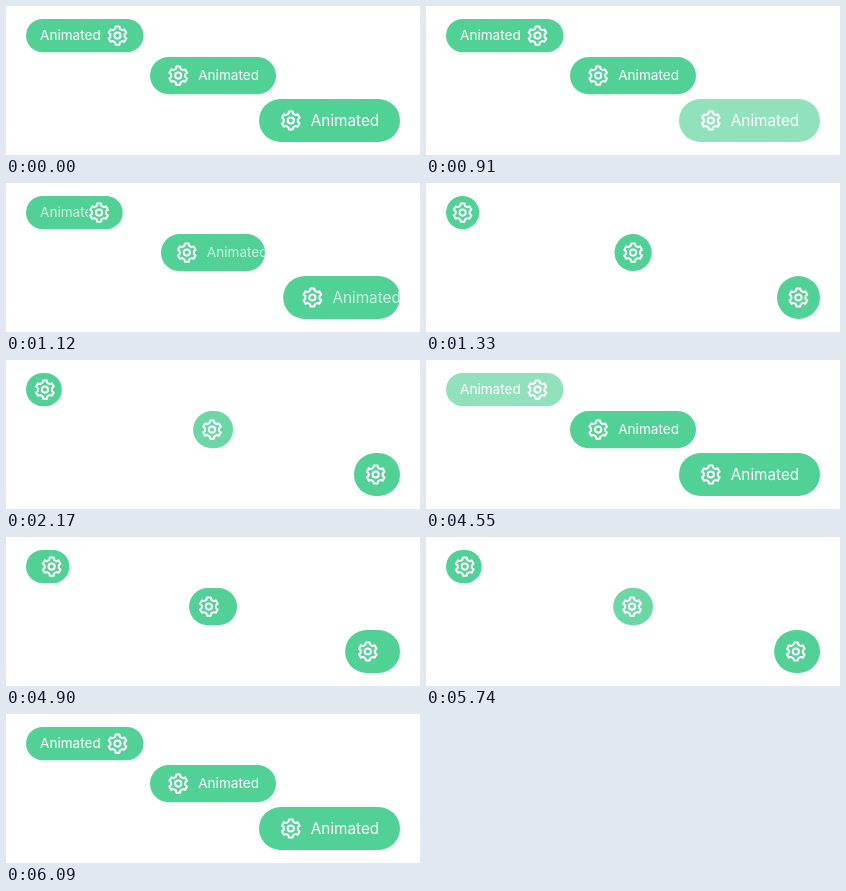
Write an HTML page that moves like this. It is 414 by 149 pixels and loops after 6.3 s.

```html
<!DOCTYPE html>
<html lang="en">
<head>
<meta charset="utf-8">
<title>Animated buttons</title>
<style>
  html, body { margin: 0; width: 100%; height: 100%; overflow: hidden; background: #fff; }
  #stage { display: block; width: 414px; height: 149px; }
  text { font-family: Inter, Roboto, sans-serif; fill: #fff; }
  .pill { fill: #52d196; }
  .gear { fill: none; stroke: #fff; stroke-width: 2; stroke-linejoin: round; }
</style>
</head>
<body>
<svg id="stage" viewBox="0 0 414 149"></svg>
<script>
const LOOP = 6300, STEP = 70;

// Pairs are [expanded, collapsed].
const buttons = [
  { x: [20, 20], w: [117.5, 33.2], y: 13, h: 33.2, icon: [111.5, 36.6], font: 13.6, labelFirst: true,
    presses: [[4550, 4690]] },
  { x: [144, 188.5], w: [126, 37.2], y: 51, h: 37.2, icon: [172.2, 207.1], font: 13.6,
    presses: [[1960, 2170], [5600, 5740]] },
  { x: [253, 351], w: [141, 43], y: 93, h: 43, icon: [284.8, 372.4], font: 15.3,
    presses: [[910, 1050]] }
];

// Each entry: start, duration, collapse amount at the end.
const toggles = [[1010, 320, 1], [2130, 320, 0], [4650, 330, 1], [5700, 330, 0]];

const stage = document.getElementById('stage');
const mix = ([from, to], amount) => from + (to - from) * amount;

function add(parent, tag, attrs) {
  const node = document.createElementNS('http://www.w3.org/2000/svg', tag);
  set(node, attrs);
  parent.append(node);
  return node;
}

function set(node, attrs) {
  for (const key in attrs) node.setAttribute(key, attrs[key]);
}

function gearPath() {
  const points = [];
  const profile = [[-19, 7.2], [-12, 9.3], [12, 9.3], [19, 7.2]];
  for (let tooth = 0; tooth < 6; tooth++) {
    for (const [offset, radius] of profile) {
      const angle = (tooth * 60 - 90 + offset) * Math.PI / 180;
      points.push(`${(radius * Math.cos(angle)).toFixed(2)} ${(radius * Math.sin(angle)).toFixed(2)}`);
    }
  }
  return `M${points.join('L')}Z`;
}

for (const button of buttons) {
  const { y, h, font } = button;
  button.group = add(stage, 'g', {});
  button.pill = add(button.group, 'rect', { class: 'pill', y, height: h, rx: h / 2 });
  button.window = add(button.group, 'svg', { y, height: h, overflow: 'hidden' });
  button.label = add(button.window, 'text', {
    x: button.labelFirst ? 14 : 9, y: h / 2 + font * 0.36, 'font-size': font
  });
  button.label.textContent = 'Animated';
  button.gear = add(button.group, 'g', { class: 'gear' });
  add(button.gear, 'path', { d: gearPath() });
  add(button.gear, 'circle', { r: 3.1 });
}

// Ease-in-out, cubic-bezier(.42, 0, .58, 1).
function ease(t) {
  if (t <= 0 || t >= 1) return Math.min(1, Math.max(0, t));
  let low = 0, high = 1;
  for (let i = 0; i < 20; i++) {
    const s = (low + high) / 2;
    const x = 3 * (1 - s) ** 2 * s * 0.42 + 3 * (1 - s) * s * s * 0.58 + s ** 3;
    if (x < t) low = s; else high = s;
  }
  return low * low * (3 - 2 * low);
}

function collapseAt(time) {
  let amount = 0;
  for (const [start, duration, end] of toggles) {
    if (time >= start) amount = mix([1 - end, end], ease((time - start) / duration));
  }
  return amount;
}

function opacityAt(time, presses) {
  for (const [down, up] of presses) {
    if (time >= down && time < up) return 0.63;
    if (time >= up && time < up + STEP) return 0.85;
  }
  return 1;
}

function draw(time) {
  const amount = collapseAt(time);
  for (const button of buttons) {
    const x = mix(button.x, amount), w = mix(button.w, amount), icon = mix(button.icon, amount);
    const left = button.labelFirst ? x : icon + 11;
    const right = button.labelFirst ? icon - 11 : x + w;
    set(button.pill, { x, width: w, 'fill-opacity': opacityAt(time, button.presses) });
    set(button.window, { x: left, width: Math.max(0, right - left) });
    set(button.label, { opacity: Math.max(0, 1 - amount * 1.25) });
    set(button.gear, { transform: `translate(${icon} ${button.y + button.h / 2})` });
  }
}

const origin = performance.now();
function tick() {
  const time = (performance.now() - origin) % LOOP;
  draw(Math.floor(time / STEP) * STEP);
  requestAnimationFrame(tick);
}
tick();
</script>
</body>
</html>
```
